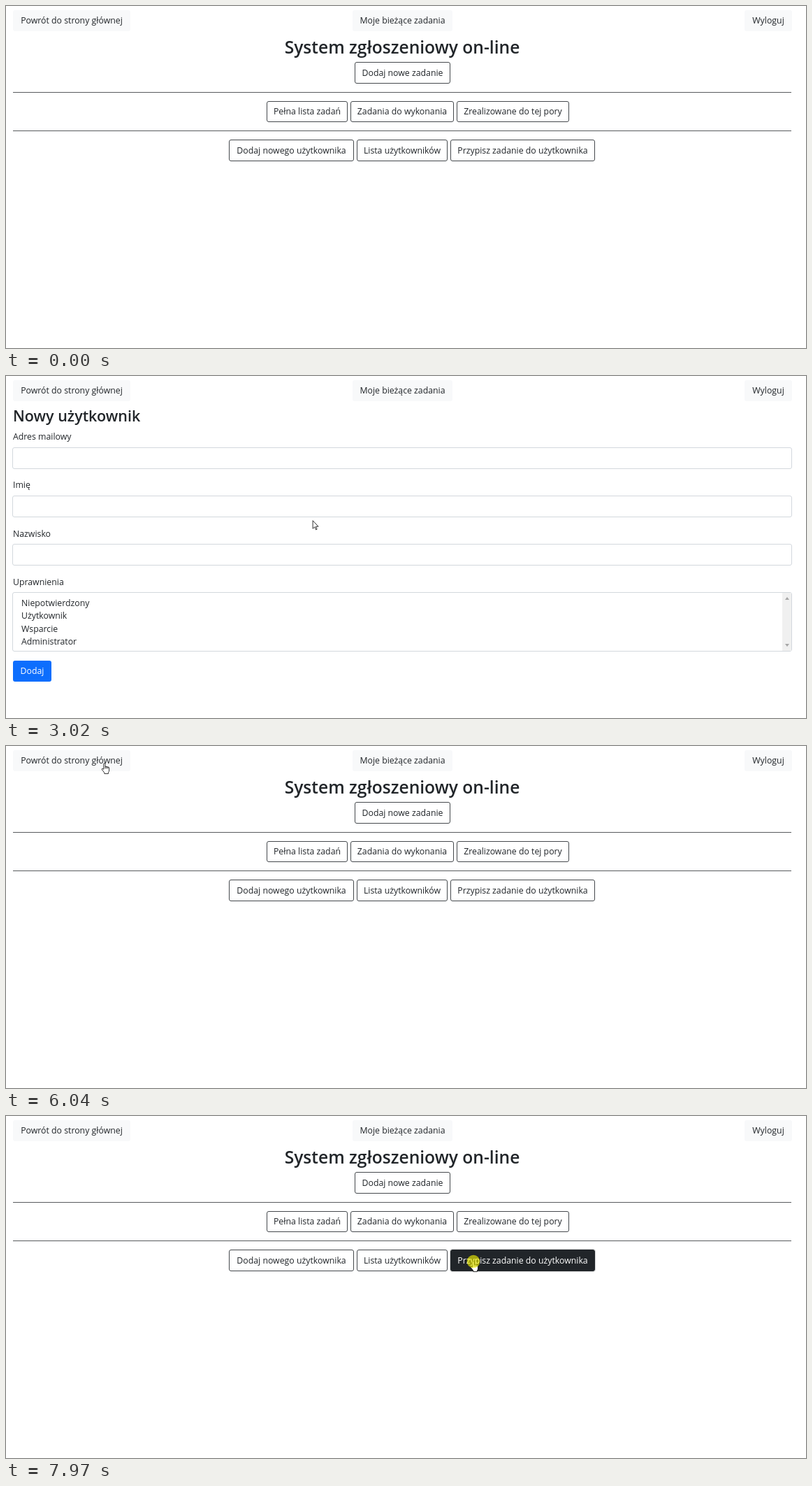
Write an HTML page that moves like this. It is 1145x489 px and loops after 8 s.

```html
<!DOCTYPE html>
<html lang="pl">
<head>
<meta charset="utf-8">
<title>System zgłoszeniowy</title>
<style>
html, body { margin: 0; width: 100%; height: 100%; overflow: hidden; background: #fff; }
body { position: relative; color: #212529; font: 12.3px/18px "Open Sans", "Noto Sans", sans-serif; }
body *, .page { position: absolute; box-sizing: border-box; white-space: nowrap; }
.page { inset: 0; }
.btn { display: flex; align-items: center; justify-content: center; border-radius: 3px; }
.dark { border: 1px solid #45494d; }
.light { background: #f8f9fa; }
.blue { background: #0d6efd; color: #fff; }
h1, h2 { margin: 0; font-weight: 600; line-height: 32px; }
h1 { left: 267px; width: 600px; top: 43px; font-size: 24.6px; text-align: center; }
h2 { left: 10px; top: 41px; font-size: 21.5px; }
hr { left: 10px; width: 1114px; height: 1px; margin: 0; border: 0; background: #585b5e; }
.field { left: 9px; width: 1116px; border: 1px solid #d3d8dd; border-radius: 3px; }
.bar { right: 0; top: 0; width: 13px; height: 100%; background: #f0f0f0; }
.bar i { left: 4px; border: 3px solid transparent; }
.up { top: 3px; border-bottom: 4px solid #a6a6a6 !important; }
.down { bottom: 3px; border-top: 4px solid #a6a6a6 !important; }
svg { left: 0; top: 0; }
</style>
</head>
<body>
<div class="page" id="home">
  <h1>System zgłoszeniowy on-line</h1>
  <hr style="top:123px"><hr style="top:178px">
</div>
<div class="page" id="form"><h2>Nowy użytkownik</h2></div>
<div class="page" id="top"></div>
<svg width="1145" height="489">
  <g id="arrow"><path d="M.5 .5V12l2.7-2.4 1.7 4 1.6-.7-1.7-3.9h3.6z" fill="#fff" stroke="#000" stroke-width=".8"/></g>
  <g id="hand"><path d="M-1.2 9.4V1.7a1.1 1.1 0 0 1 2.2 0V5.6q1.1-.9 2 .2 1.2-.7 1.9 .4 1.5-.5 1.7 1V11q0 1.7-1.2 2.8V15.6H-.2V14.2L-3.6 9.8q-.6-1.2 .5-1.6 1 0 1.9 1.2zM1 5.6V8.4M3 5.8V8.4M4.9 6.2V8.4" fill="#fff" stroke="#000" stroke-width=".8"/></g>
  <g id="beam"><path d="M-2.5-6H-.6L0-5.4 .6-6H2.5M0-5.4V5.4M-2.5 6H-.6L0 5.4 .6 6H2.5" fill="none" stroke="#222" stroke-width=".9"/></g>
  <circle id="press" r="9.3" fill="#ff0" fill-opacity=".6"/>
</svg>
<script>
const LOOP = 8000, TO_FORM = 2510, TO_HOME = 6040, FADE = 150;
const $ = id => document.getElementById(id);

function add(parent, cls, x, y, w, h, text = '') {
  const el = document.createElement('div');
  el.className = cls;
  el.textContent = text;
  Object.assign(el.style, { left: x + 'px', top: y + 'px' });
  if (w) el.style.width = w + 'px';
  if (h) el.style.height = h + 'px';
  $(parent).append(el);
  return el;
}

const buttons = [
  ['top', 'light', 10, 6, 168, 30, 'Powrót do strony głównej'],
  ['top', 'light', 496, 6, 143, 30, 'Moje bieżące zadania'],
  ['top', 'light', 1057, 6, 68, 30, 'Wyloguj'],
  ['home', 'dark', 499, 80, 137, 31, 'Dodaj nowe zadanie'],
  ['home', 'dark', 373, 136, 116, 30, 'Pełna lista zadań'],
  ['home', 'dark', 493, 136, 148, 30, 'Zadania do wykonania'],
  ['home', 'dark', 645, 136, 161, 30, 'Zrealizowane do tej pory'],
  ['home', 'dark', 319, 191, 179, 31, 'Dodaj nowego użytkownika'],
  ['home', 'dark', 502, 191, 130, 31, 'Lista użytkowników'],
  ['home', 'dark', 636, 191, 207, 31, 'Przypisz zadanie do użytkownika'],
  ['form', 'blue', 10, 407, 55, 30, 'Dodaj']
].map(([page, kind, x, y, w, h, text]) =>
  ({ page, kind, x, y, w, h, el: add(page, 'btn ' + kind, x, y, w, h, text) }));

const fields = [
  ['Adres mailowy', 78, 102, 31],
  ['Imię', 147, 171, 31],
  ['Nazwisko', 217, 240, 31],
  ['Uprawnienia', 286, 309, 85]
].map(([label, ly, y, h]) => {
  add('form', '', 10, ly, 0, 0, label);
  return { x: 9, y, w: 1116, h, el: add('form', 'field', 9, y, 0, h) };
});
fields[3].el.innerHTML = '<div class="bar"><i class="up"></i><i class="down"></i></div>';
['Niepotwierdzony', 'Użytkownik', 'Wsparcie', 'Administrator']
  .forEach((name, i) => add('form', '', 22, 316 + i * 18.3, 0, 0, name));

// Pointer path: start, end, from, to, easing
const slowIn = u => u ** 1.35;
const slowOut = u => 1 - (1 - u) ** 2;
const smooth = u => u * u * (3 - 2 * u);
const moves = [
  [570, 1020, [1092, 478], [671, 299], slowOut],
  [1280, 1610, [671, 299], [463, 215], slowIn],
  [1610, 1890, [463, 215], [440, 207], slowOut],
  [2990, 3770, [440, 207], [143, 38], smooth],
  [3810, 4070, [143, 38], [141, 24], smooth],
  [6200, 6980, [141, 24], [571, 202], smooth],
  [7280, 7600, [571, 202], [669, 207], smooth]
];
const clicks = [[2190, buttons[7]], [5750, buttons[0]], [7940, buttons[9]]];

const clamp = v => Math.max(0, Math.min(1, v));
const pageAt = t => t >= TO_FORM && t < TO_HOME ? 'form' : 'home';
const inside = (b, [x, y]) => x >= b.x && x < b.x + b.w && y >= b.y && y < b.y + b.h;

function pointer(t) {
  const m = moves.filter(m => t >= m[0]).pop();
  if (!m) return null;
  const [start, end, a, b, ease] = m;
  const u = ease(clamp((t - start) / (end - start)));
  return a.map((v, i) => v + (b[i] - v) * u);
}

function hit(b, t) {
  const p = pointer(t);
  return !!p && (b.page === 'top' || b.page === pageAt(t)) && inside(b, p);
}

// Linear fade: share of the last 150 ms spent over the button
function hover(b, t) {
  let n = 0;
  for (let d = 0; d < FADE; d += 10) n += hit(b, t - d);
  return smooth(n * 10 / FADE);
}

function cursorKind(t, p) {
  // The hand stays after the page swap until the pointer moves
  if (t >= TO_FORM && t < 2990) return 'hand';
  if (buttons.some(b => hit(b, t))) return 'hand';
  if (pageAt(t) === 'form' && fields.slice(0, 3).some(f => inside(f, p))) return 'beam';
  return 'arrow';
}

const show = (el, on) => { el.style.visibility = on ? 'visible' : 'hidden'; };

function paintButton(b, t) {
  const s = b.el.style;
  if (b.kind === 'dark') {
    const k = hover(b, t), c = [33, 37, 41];
    s.background = `rgba(${c},${k})`;
    s.color = `rgb(${c.map(v => v + (255 - v) * k)})`;
    s.borderColor = `rgb(${[69, 73, 77].map((v, i) => v + (c[i] - v) * k)})`;
  }
  const click = clicks.find(c => c[1] === b && t >= c[0] && t < c[0] + 350);
  const swapped = click && b.kind === 'light' && t >= TO_HOME;
  const f = click && !swapped ? smooth(clamp((t - click[0]) / FADE)) : 0;
  const tint = b.kind === 'dark' ? '33,37,41' : '211,212,213';
  s.boxShadow = f ? `0 0 0 ${3.2 * Math.sqrt(f)}px rgba(${tint},${.5 * Math.sqrt(f)})` : 'none';
}

function draw(t) {
  const page = pageAt(t), p = pointer(t);
  $('home').style.display = page === 'home' ? '' : 'none';
  $('form').style.display = page === 'form' ? '' : 'none';
  buttons.forEach(b => paintButton(b, t));

  const kind = p && cursorKind(t, p);
  for (const id of ['arrow', 'hand', 'beam']) {
    show($(id), id === kind);
    if (id === kind) $(id).setAttribute('transform', `translate(${p})`);
  }
  const pressed = clicks.some(c => t >= c[0] && t < c[0] + 100);
  show($('press'), pressed);
  if (pressed) $('press').setAttribute('transform', `translate(${p[0]},${p[1] + 1})`);
}

const began = performance.now();
function frame() {
  draw((performance.now() - began) % LOOP);
  requestAnimationFrame(frame);
}
frame();
</script>
</body>
</html>
```
